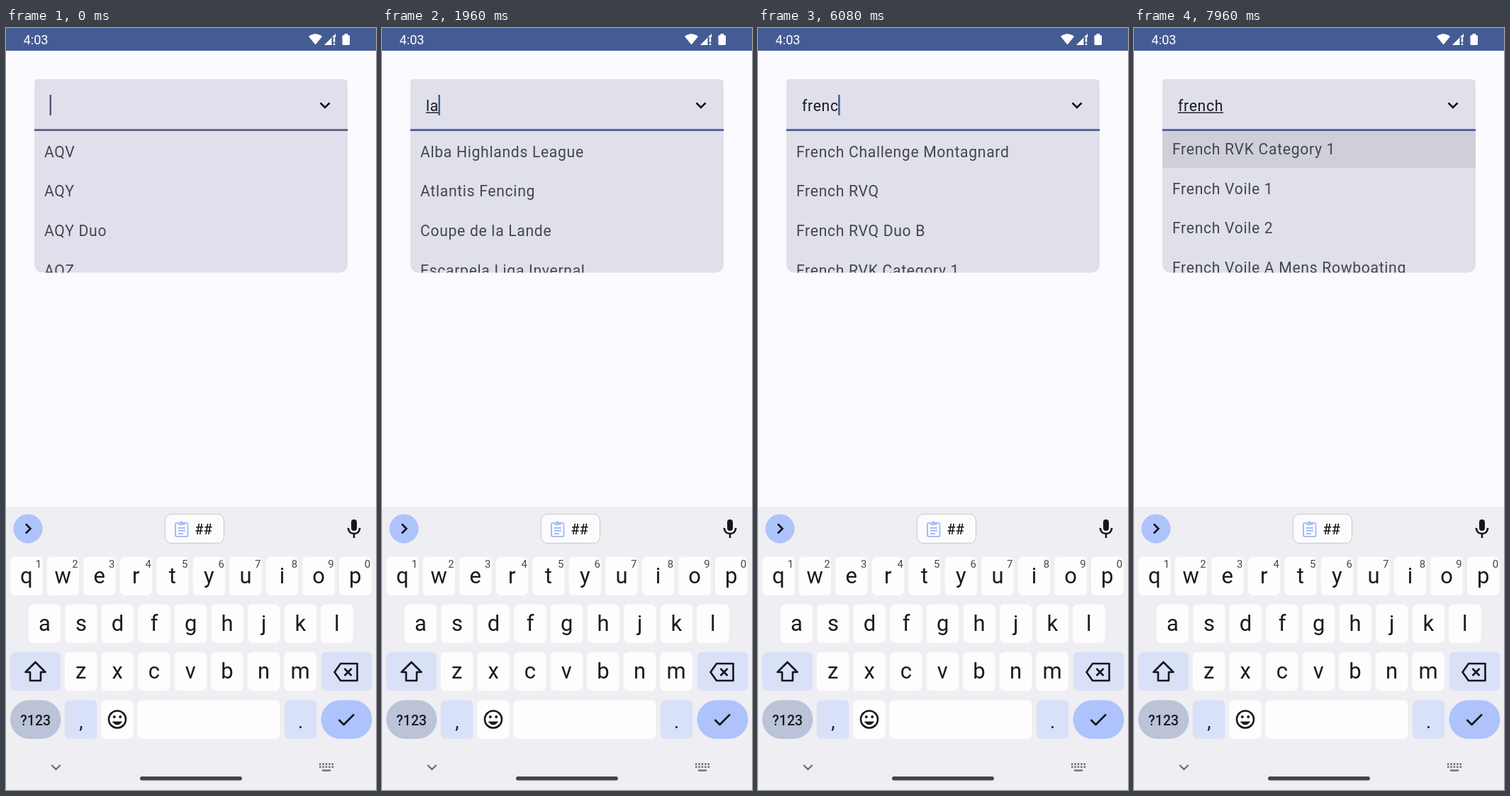
Write an HTML page that moves like this. It is 522 by 1073 pixels and loops after 8 s.

```html
<!DOCTYPE html>
<html lang="en">
<head>
<meta charset="utf-8">
<title>Searchable dropdown</title>
<style>
  html, body { margin: 0; width: 100%; height: 100%; overflow: hidden; background: #fbfafe; }
  svg { display: block; width: 522px; height: 1073px; }
  text { font-family: Roboto, "Open Sans", sans-serif; white-space: pre; }
  .body { font-size: 21.2px; letter-spacing: .66px; }
  .row { fill: #44464c; }
  .key { font-size: 31px; fill: #1a1b1f; text-anchor: middle; }
  .hint { font-size: 15px; fill: #44464c; text-anchor: middle; }
  .line { fill: none; stroke: #15171d; stroke-width: 2.6; }
</style>
</head>
<body>
<svg viewBox="0 0 522 1073">
  <defs>
    <clipPath id="menuClip"><path d="M40 145H482V331Q482 344.5 468.500 344.500H53.500Q40 344.500 40 331Z"/></clipPath>
    <clipPath id="rowClip"><rect x="40" width="442" height="55.67" id="rowBox"/></clipPath>
    <radialGradient id="rippleFill">
      <stop offset="0" stop-opacity=".07"/><stop offset=".72" stop-opacity=".06"/><stop offset="1" stop-opacity="0"/>
    </radialGradient>
  </defs>

  <rect width="522" height="1073" fill="#fbfafe"/>

  <!-- Status bar -->
  <rect width="522" height="32" fill="#455b94"/>
  <text x="24.500" y="23" font-size="18.2" fill="#fff">4:03</text>
  <g fill="#fff">
    <path d="M427 12Q436.500 4.500 446 12L436.500 23.500Z"/>
    <path d="M449 24L465 8V24Z"/>
    <path d="M459.500 13H466V25H459.500Z" fill="#455b94"/>
    <path d="M461.800 13.500h2.400v6.500h-2.400zM461.800 21.600h2.400v2.400h-2.400z"/>
    <path d="M477.500 8h4.500v2h1.500q1.500 0 1.500 1.500v11q0 1.500-1.500 1.500h-7.500q-1.500 0-1.500-1.500v-11q0-1.500 1.500-1.500h1.500z"/>
  </g>

  <!-- Field and menu -->
  <path id="panel" fill="#dfe0ea" d="M40 78Q40 72 46 72H476Q482 72 482 78V331Q482 344.500 468.500 344.500H53.500Q40 344.500 40 331Z"/>
  <g clip-path="url(#menuClip)">
    <g id="list">
      <g clip-path="url(#rowClip)">
        <rect id="press" x="40" width="442" height="55.67"/>
        <circle id="ripple" cx="222" fill="url(#rippleFill)"/>
      </g>
      <g id="rows"></g>
    </g>
  </g>
  <rect id="rule" x="40" y="142.300" width="442" height="2.700" fill="#455a97"/>
  <text id="input" class="body" x="62" y="117" fill="#191b20"></text>
  <rect id="compose" y="118.600" height="1.400" fill="#191b20"/>
  <rect id="caret" y="94" width="2.500" height="29" fill="#455a97"/>
  <path class="line" d="M443.500 105.500L450 112L456.500 105.500"/>

  <!-- Keyboard -->
  <rect y="674" width="522" height="399" fill="#efeef2"/>
  <circle cx="31" cy="705" r="20.500" fill="#aec3fc"/>
  <path class="line" d="M28 698.500L34.500 705L28 711.500"/>
  <rect x="224.500" y="684.500" width="83" height="41" rx="9" fill="#fcfcfd" stroke="#d2d2d5" stroke-width="1.300"/>
  <g fill="none" stroke="#a9bef6" stroke-width="2">
    <rect x="239" y="697" width="17.500" height="19" rx="2"/>
    <path d="M242.500 704H253M242.500 708H253M242.500 712H250"/>
  </g>
  <path d="M243 700V696H245.500Q247.700 692 250 696H252.500V700Z" fill="#a9bef6"/>
  <text x="266.500" y="713" font-size="20" font-weight="500" fill="#1a1b1f">##</text>
  <rect x="487" y="692" width="8" height="16" rx="4" fill="#15171d"/>
  <path class="line" stroke-width="2.400" d="M482.800 704Q483.500 712 491 712T499.200 704M491 712V718"/>
  <g id="keys"></g>

  <g class="line" stroke-linejoin="round">
    <path d="M41.500 893L27.500 907H34V919H49V907H55.500Z"/>
    <path d="M472 895H495.500V919H472L463.500 907ZM477.500 902L487.500 912M487.500 902L477.500 912"/>
    <circle cx="157" cy="973.500" r="12"/>
    <path d="M150.500 977Q157 985 163.500 977Z" fill="#15171d" stroke-width="1"/>
    <path d="M469.500 974L476.500 981L491 966.500"/>
  </g>
  <circle cx="152.800" cy="970" r="2" fill="#15171d"/>
  <circle cx="161.200" cy="970" r="2" fill="#15171d"/>

  <path d="M64.500 1038L70.500 1044L76.500 1038" fill="none" stroke="#66676c" stroke-width="2"/>
  <path d="M442 1036.500H462M442 1040.500H462" stroke="#66676c" stroke-width="2.300" stroke-dasharray="2.400 2"/>
  <path d="M446 1045.500H458" stroke="#66676c" stroke-width="2.300"/>
  <rect x="189" y="1054" width="144" height="5.500" rx="2.750" fill="#444549"/>
</svg>

<script>
const LOOP = 8000, TOP = 145, ROW = 55.67, PRESSED_ROW = 3;
const $ = id => document.getElementById(id);

const names = [
  'AQV', 'AQY', 'AQY Duo', 'AQZ',
  'Alba Highlands League', 'Alder Skiff', 'Arno Paddling', 'Ashen Gold Cup',
  'Atlantis Fencing', 'Coupe de la Lande', 'Escarpela Liga Invernal',
  'Sunrise La Loma', 'Sunrise La Loma 2',
  'French Challenge Montagnard', 'French RVQ', 'French RVQ Duo B',
  'French RVK Category 1', 'French Voile 1', 'French Voile 2',
  'French Voile A Mens Rowboating', 'French Voile B'
];

// [start, field text]
const typing = [
  [0, ''], [1000, 'l'], [1700, 'la'], [2300, 'la '], [2800, 'la l'],
  [3650, 'la '], [3850, 'la'], [4050, 'l'], [4250, ''],
  [4800, 'f'], [5150, 'fr'], [5450, 'fre'], [5750, 'fren'],
  [6000, 'frenc'], [6400, 'french']
];

const scrollTrack = [[7540, 0], [7630, 48], [7710, 92], [7800, 130], [7880, 153], [7960, 170.5], [8000, 177]];
const pressTrack = [[7490, 0], [7560, .09], [7680, .09], [7960, .075], [8000, .07]];
const rippleTrack = [[7490, 0], [7650, 1], [7720, 1], [7940, 0]];
const radiusTrack = [[7490, 30], [7630, 225], [7700, 290]];

function track(steps, t) {
  if (t <= steps[0][0]) return steps[0][1];
  for (let i = 1; i < steps.length; i++) {
    const [t0, a] = steps[i - 1], [t1, b] = steps[i];
    if (t <= t1) return a + (b - a) * (t - t0) / (t1 - t0);
  }
  return steps[steps.length - 1][1];
}

function add(parent, tag, attrs, text = '') {
  const el = document.createElementNS('http://www.w3.org/2000/svg', tag);
  for (const name in attrs) el.setAttribute(name, attrs[name]);
  el.textContent = text;
  parent.append(el);
}

function set(id, attrs) {
  for (const name in attrs) $(id).setAttribute(name, attrs[name]);
}

const mix = (a, b, k) => `rgb(${a.map((v, i) => v + (b[i] - v) * k)})`;

function key(x, y, width, fill = '#fdfdfd', round = 7) {
  add($('keys'), 'rect', { x, y, width, height: 54.5, rx: round, fill });
}

function letters(text, x, y, hints) {
  [...text].forEach((ch, i) => {
    const left = x + i * 51.55;
    key(left, y, 45.5);
    add($('keys'), 'text', { class: 'key', x: left + 22.7, y: y + 37 }, ch);
    if (hints) add($('keys'), 'text', { class: 'hint', x: left + 40, y: y + 15.500 }, hints[i]);
  });
}

function buildKeys() {
  const soft = '#d9e1f9';
  letters('qwertyuiop', 6, 744.5, '1234567890');
  letters('asdfghjkl', 31.7, 811.5);
  letters('zxcvbnm', 83, 878.8);
  key(6, 878.8, 71.5, soft);
  key(444.5, 878.8, 72, soft);
  key(6, 946.5, 71.5, '#bbc3d8', 27);
  add($('keys'), 'text', { x: 41.7, y: 981.5, 'font-size': 19.500, 'font-weight': 500, 'text-anchor': 'middle', fill: '#1a1b1f' }, '?123');
  key(83, 946.5, 45.5, soft);
  key(134.5, 946.5, 45.5);
  key(185.5, 946.5, 201);
  key(393, 946.5, 45.5, soft);
  key(444.5, 946.5, 72, '#aec3fc', 27);
  [[',', 106], ['.', 415.5]].forEach(([ch, x]) =>
    add($('keys'), 'text', { class: 'key', x, y: 986, style: 'font-size:27px' }, ch));
}

let shown = null;
function showQuery(query) {
  if (query === shown) return;
  shown = query;
  $('input').textContent = query;
  $('rows').replaceChildren();
  names.filter(name => name.toLowerCase().includes(query)).slice(0, 9).forEach((name, i) =>
    add($('rows'), 'text', { class: 'body row', x: 54, y: TOP + i * ROW + 36.5 }, name));
}

function render(t) {
  const [since, query] = typing.filter(step => step[0] <= t).pop();
  showQuery(query);

  const end = 62 + $('input').getComputedTextLength();
  const start = query.lastIndexOf(' ') + 1;
  const size = query.length - start;
  const wordWidth = size ? $('input').getSubStringLength(start, size) : 0;
  const composing = size && t - since > 150;
  set('compose', { x: end - wordWidth, width: composing ? wordWidth : 0 });

  const lit = Math.floor((t - since) / 500) % 2 === 0;
  set('caret', { x: end - .5, opacity: lit ? 1 : 0 });

  // The panel settles from a muted violet as it opens.
  const settle = track([[0, 0], [400, 1]], t);
  set('panel', { fill: mix([226, 223, 236], [223, 224, 234], settle) });
  const accent = mix([92, 89, 121], [69, 90, 151], settle);
  set('rule', { fill: accent });
  set('caret', { fill: accent });

  const rowY = TOP + PRESSED_ROW * ROW;
  set('list', { transform: `translate(0 ${-track(scrollTrack, t)})` });
  set('rowBox', { y: rowY });
  set('press', { y: rowY, opacity: track(pressTrack, t) });
  set('ripple', { cy: rowY + ROW / 2, r: track(radiusTrack, t), opacity: track(rippleTrack, t) });
}

buildKeys();
const began = performance.now();
function tick() {
  render((performance.now() - began) % LOOP);
  requestAnimationFrame(tick);
}
tick();
</script>
</body>
</html>
```
